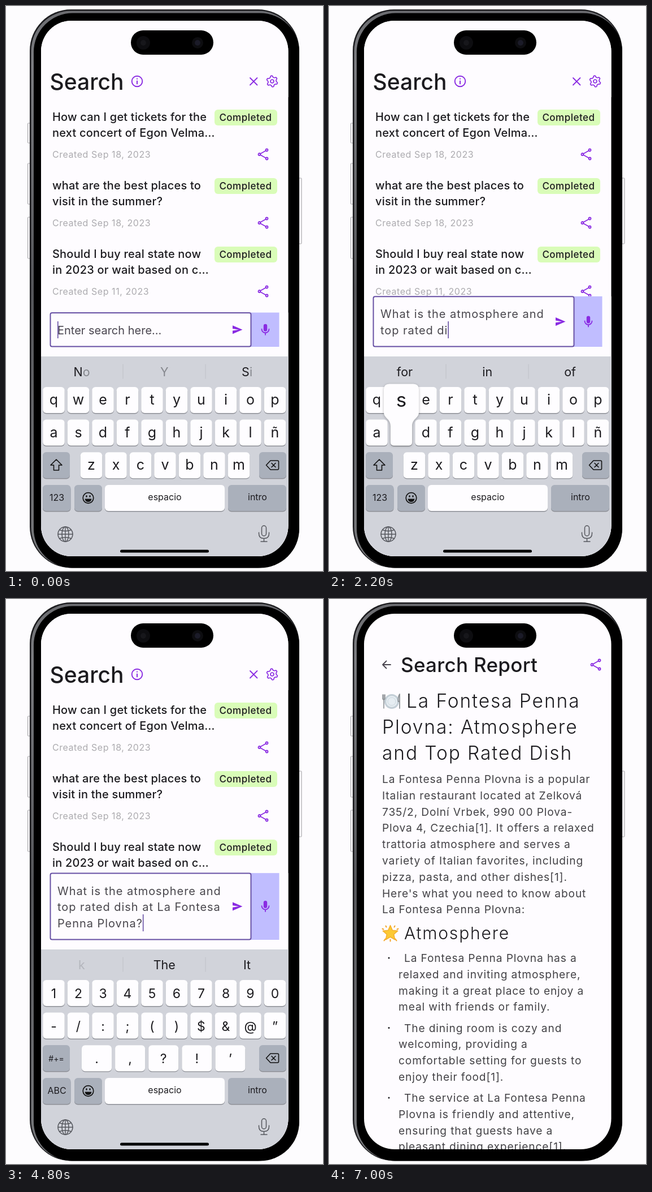
Write an HTML page that moves like this. It is 561x998 px and loops after 8000 ms.

```html
<!DOCTYPE html>
<html lang="en">
<head>
<meta charset="utf-8">
<title>Phone search</title>
<style>
  html, body { margin: 0; width: 100%; height: 100%; overflow: hidden; background: #fdfcfe; }
  svg { display: block; width: 100vw; height: 100vh; font-family: Inter, sans-serif; fill: #1c1b1f; }
  .h1 { font-size: 39px; font-weight: 500; }
  .title { font-size: 20px; font-weight: 500; letter-spacing: .2px; }
  .date { font-size: 16px; letter-spacing: .55px; fill: #acabaf; }
  .badge { font-size: 17px; font-weight: 500; letter-spacing: .5px; }
  .hint { font-size: 20px; fill: #49454f; }
  .typed { font-size: 20px; letter-spacing: .95px; fill: #49474d; white-space: pre; }
  .mid { text-anchor: middle; }
  .word { font-size: 21.5px; }
  .key { font-size: 25px; }
  .num { font-size: 23px; }
  .label { font-size: 16px; }
  .small { font-size: 14px; }
  .pop { font-size: 35px; }
  .tab { font-size: 12px; font-weight: 500; }
  .bar { font-size: 35px; font-weight: 500; letter-spacing: .3px; }
  .h2 { font-size: 33.5px; font-weight: 300; letter-spacing: 1.9px; }
  .h3 { font-size: 30px; font-weight: 300; letter-spacing: 1.8px; }
  .body { font-size: 19.2px; letter-spacing: .85px; fill: #434246; }
  .line { fill: none; stroke-linecap: round; stroke-linejoin: round; }
</style>
</head>
<body>
<svg viewBox="0 0 561 998">
  <defs>
    <linearGradient id="metal" x2="0" y2="1">
      <stop stop-color="#6b6c70"/><stop offset=".1" stop-color="#7c7d81"/>
      <stop offset=".5" stop-color="#55565a"/><stop offset="1" stop-color="#77787b"/>
    </linearGradient>
    <clipPath id="glass"><rect x="62" y="26" width="437.5" height="946" rx="54"/></clipPath>
  </defs>
  <g fill="#f3f2f4" stroke="#a5a4a8">
    <rect x="38.5" y="207" width="6" height="35" rx="1"/>
    <rect x="38.5" y="278" width="6" height="72" rx="1"/>
    <rect x="38.5" y="373" width="6" height="73" rx="1"/>
    <rect x="517" y="304" width="6" height="116" rx="1"/>
  </g>
  <rect x="42" y="6" width="477" height="986.5" rx="73" fill="#1c1c1f"/>
  <rect x="44.5" y="8.500" width="473" height="983" rx="71" fill="url(#metal)"/>
  <rect x="49" y="12.500" width="470" height="980" rx="69" fill="#000"/>
  <g id="screen" clip-path="url(#glass)"></g>
  <rect x="221" y="43" width="146" height="43" rx="21.5" fill="#000"/>
  <g fill="#0d0d10">
    <circle cx="243" cy="65" r="12"/><circle cx="339" cy="65" r="10"/>
    <circle cx="243" cy="65" r="5" fill="#17171b"/><circle cx="339" cy="65" r="5" fill="#1b1b28"/>
  </g>
</svg>
<script>
const PURPLE = '#8a2be2', ACCENT = '#6750a4', PAPER = '#fefcff', LOOP = 8000;
const screen = document.getElementById('screen');

const clamp = (v, a = 0, b = 1) => Math.min(b, Math.max(a, v));
const ease = k => k * k * (3 - 2 * k);
const text = (x, y, s, cls) => `<text x="${x}" y="${y}" class="${cls}">${s.replace('&', '&amp;')}</text>`;
const rect = (x, y, w, h, fill, rx = 0, more = '') =>
  `<rect x="${x}" y="${y}" width="${w}" height="${h}" rx="${rx}" fill="${fill}" ${more}/>`;
const line = (d, color, width = 2) => `<path class="line" d="${d}" stroke="${color}" stroke-width="${width}"/>`;
const fill = (d, color) => `<path d="${d}" fill="${color}"/>`;
const ring = (x, y, r, color, width = 2) =>
  `<circle cx="${x}" cy="${y}" r="${r}" fill="none" stroke="${color}" stroke-width="${width}"/>`;
const move = (x, y, body) => `<g transform="translate(${x} ${y})">${body}</g>`;
const polar = (n, radius) => 'M' + Array.from({ length: n }, (_, i) => {
  const a = (i / n) * 2 * Math.PI - Math.PI / 2;
  return `${(radius(i) * Math.cos(a)).toFixed(2)} ${(radius(i) * Math.sin(a)).toFixed(2)}`;
}).join('L') + 'z';

const share = (x, y) => move(x, y, line('M5-6.500L-5-1M-5 1L5 6.500', PURPLE, 1.7) +
  ring(6.5, -7.5, 2, PURPLE, 1.8) + ring(-6.5, 0, 2, PURPLE, 1.8) + ring(6.5, 7.5, 2, PURPLE, 1.8));
const mic = (x, y) => move(x, y,
  rect(-3.2, -10, 6.4, 13, PURPLE, 3.2) + line('M-6.5-1a6.5 6.5 0 0 0 13 0M0 6V9', PURPLE, 1.8));

// ---- search page ----
const items = [
  ['Which is the best way to go', 'to Tarny Beach from New…', '18'],
  ['Which is the best recipe of', 'apple pie?', '18'],
  ['How can I get tickets for the', 'next concert of Egon Velma…', '18'],
  ['what are the best places to', 'visit in the summer?', '18'],
  ['Should I buy real state now', 'in 2023 or wait based on c…', '11'],
];
const itemList = items.map(([a, b, day], i) => move(0, (i - 2) * 121,
  text(82, 203, a, 'title') + text(82, 231, b, 'title') +
  text(82, 268, `Created Sep ${day}, 2023`, 'date') +
  rect(369, 183, 111, 28, '#d9fcb8', 6) + text(424, 203, 'Completed', 'badge mid') + share(455, 262))).join('');

const header = rect(62, 26, 438, 135, PAPER) + text(77.5, 148, 'Search', 'h1') +
  ring(232, 133, 9.3, PURPLE, 1.9) + line('M232 132.5v5M232 128.6v.1', PURPLE, 2) +
  line('M432 127l12.500 12.500M444.500 127l-12.500 12.500', PURPLE, 1.8) +
  move(471, 133, line(polar(24, i => ((i + 1) % 4 < 2 ? 9.8 : 7.2)), PURPLE, 1.7) + ring(0, 0, 3, PURPLE, 1.7));

const GRAY = '#77757b';
const tabs = ['Search', 'Chat', 'Feed', 'Menu'].map((name, i) =>
  `<g fill="${i ? GRAY : PURPLE}">${text(115 + i * 110, 927, name, 'tab mid')}</g>`).join('') +
  ring(113, 899.5, 5.8, PURPLE) + line('M117.500 904l6 6', PURPLE, 2.2) +
  line('M216.500 911v-18.500h19v14h-15z', GRAY, 1.9) +
  line('M327.500 894.500h16v15.500h-16zM331 892v2M340 892v2', GRAY, 2) +
  rect(327, 894, 17, 5, GRAY) + rect(336, 902, 5, 5, GRAY) +
  [0, 1, 2, 3, 4, 5, 6, 7, 8].map(i => rect(437 + i % 3 * 6.3, 893.5 + Math.floor(i / 3) * 6.3, 4.4, 4.4, GRAY)).join('');

// ---- typing ----
const query = ['What is the atmosphere and ', 'top rated dish at La Fontesa ', 'Penna Plovna?'];
const letters = query.join('');
const pace = [[0, 0], [100, 0], [1300, 28], [2200, 39], [3800, 57], [4500, 68], [4600, 68], [4700, 69], [LOOP, 69]];
function typedAt(t) {
  const i = pace.findLastIndex(p => t >= p[0]);
  const [t0, n0] = pace[i], [t1, n1] = pace[i + 1];
  return n0 + (n1 - n0) * (t - t0) / (t1 - t0);
}

const dim = (s, color = '#85878d') => `<tspan fill="${color}">${s}</tspan>`;
const suggestions = [
  [0, 'N' + dim('o'), dim('Y'), 'S' + dim('i')],
  [200, '«Wh»', 'What', 'Who'],
  [400, 'is', 'are', 'about'],
  [600, '«th»', 'the', 'their'],
  [800, '«atm»', 'atmosphere', 'atm'],
  [1200, 'atmosphere', 'how', 'the'],
  [1400, '«to»', 'top', 'total'],
  [1700, '«rat»', 'rated', 'rate'],
  [2100, 'for', 'in', 'of'],
  [2300, '«dis»', 'dish', 'dishes'],
  [2600, 'at', 'in', 'the'],
  [2900, '«La»', 'Las', 'Last'],
  [3200, '«Fon»', 'Font', 'Fonts'],
  [3700, '«P»', 'Pizza', 'Park'],
  [4000, '«Pen»', 'Penn', 'Pending'],
  [4300, '«Pl»', 'Please', 'Plan'],
  [4700, dim('k', '#b4b6bd'), 'The', 'It'],
];

// ---- keyboard ----
const DARK = '#aab0bb';
const keyCap = (x, y, w, color = '#fefdff') => rect(x, y + 1.4, w, 46, '#8d8f96', 6) + rect(x, y, w, 46, color, 6);

function layout(numeric) {
  const rows = numeric ? ['1234567890', '-/:;()$&@”', '.,?!’'] : ['qwertyuiop', 'asdfghjklñ', 'zxcvbnm'];
  return rows.flatMap((row, r) => [...row].map((char, i) => {
    const wide = numeric && r === 2;
    const x = wide ? 160.5 + i * 59.1 : (r === 2 ? 151 : 84.5) + i * 43.5;
    return { char, x, y: 673 + r * 57.6, w: wide ? 53 : 38.5 };
  }));
}

function popup({ x, y }, char) {
  const b = clamp(x, 96, 466);
  const d = `M${b - 21} ${y - 63}h42q10 0 10 10v40C${b + 31} ${y - 2} ${x + 19} ${y - 2} ${x + 19} ${y + 12}` +
    `V${y + 40}q0 6-6 6H${x - 13}q-6 0-6-6V${y + 12}C${x - 19} ${y - 2} ${b - 31} ${y - 2} ${b - 31} ${y - 13}V${y - 53}q0-10 10-10z`;
  return `<g style="filter:drop-shadow(0 1px 2px #0004)">${fill(d, '#fefdff')}</g>` + text(b, y - 22.5, char, 'pop mid');
}

function keyboard(t, progress) {
  const numeric = t >= 4600, next = letters[Math.floor(progress)] || '';
  const upper = t >= 100 && !numeric && /[A-Z]/.test(next);
  const show = c => upper ? c.toUpperCase() : c;
  const keys = layout(numeric);
  const words = suggestions.findLast(s => t >= s[0]).slice(1);
  let out = rect(62, 619, 438, 360, '#d1d3da') +
    words.map((w, i) => text(134 + i * 146.3, 653.5, w, 'word mid')).join('') +
    line('M207 633v25M353 633v25', '#bec0c7', 1) +
    keys.map(k => keyCap(k.x - k.w / 2, k.y, k.w) +
      text(k.x, k.y + (numeric ? 32 : 31), show(k.char), (numeric ? 'num' : 'key') + ' mid')).join('') +
    keyCap(65, 788, 48, upper ? '#fefdff' : DARK) + keyCap(448, 788, 48, DARK) +
    keyCap(65, 846, 49.5, DARK) + keyCap(121, 846, 49, DARK) + keyCap(175, 846, 212) + keyCap(393, 846, 103, DARK) +
    (numeric ? text(89, 817, '#+=', 'small mid')
      : `<path d="M89 801l10 10h-5.500v9h-9v-9h-5.500z" fill="${upper ? '#111' : 'none'}" stroke="#111" stroke-width="1.6" stroke-linejoin="round"/>`) +
    line('M468 803h12.500q2 0 2 2v12q0 2-2 2h-12.500l-7.500-8zM470 807.500l7 7M477 807.500l-7 7', '#111', 1.6) +
    text(90, 874, numeric ? 'ABC' : '123', 'label mid') + text(281, 873, 'espacio', 'label mid') + text(445, 873, 'intro', 'label mid') +
    ring(145.5, 869, 9.3, '#111', 1.7) + fill('M139.500 870.500h12q-1 5.500-6 5.500t-6-5.500z', '#111') +
    line('M142.500 865.500v1M148.500 865.500v1', '#111', 2.4) +
    ring(105, 933, 13, '#55575d', 1.5) +
    '<ellipse cx="105" cy="933" rx="6" ry="13" fill="none" stroke="#55575d" stroke-width="1.5"/>' +
    line('M105 920v26M92 933h26M95 925.500q10 4 20 0M95 940.500q10-4 20 0', '#55575d', 1.4) +
    rect(452.5, 918, 8, 18, 'none', 4, 'stroke="#55575d" stroke-width="1.5"') +
    line('M447.500 930v2q0 8.500 9 8.500t9-8.500v-2M456.500 941v5M451 946h11', '#55575d', 1.5);
  const pressed = keys.find(k => k.char === next.toLowerCase());
  if (t >= 100 && pressed && progress % 1 < .7) out += popup(pressed, show(pressed.char));
  return out;
}

function searchBox(t, progress, sent) {
  let left = Math.floor(progress);
  const rows = query.map(q => { const s = q.slice(0, left); left = Math.max(0, left - q.length); return s; })
    .filter((s, i) => s || !i);
  const n = rows.length, top = 541.5 - (n - 1) * 28.7, middle = (top + 602) / 2;
  let out = rect(62, top, 438, 700, PAPER) + rect(433, top, 50.5, 602 - top, '#c0bdff') +
    rect(78.5, top + .5, 355, 601 - top, PAPER, 3, sent ? 'stroke="#79747e" stroke-width="1.2"' : `stroke="${ACCENT}" stroke-width="2"`) +
    mic(459, middle);
  out += rows[0] ? rows.map((s, i) => text(91, 580 - (n - 1 - i) * 28.7, s, 'typed')).join('')
    : text(91, 580, 'Enter search here...', 'hint');
  if (sent) {
    const turn = (Math.min(t, 5600) - 5600) * .36;
    out += `<g transform="translate(413.5 ${middle}) rotate(${turn})">` +
      `<path d="M10.200-7.200A12.500 12.500 0 1 1-2.200-12.300" fill="none" stroke="${ACCENT}" stroke-width="3.8"/></g>`;
  } else {
    out += move(401, middle, fill('M0-7.500L17.500 0 0 7.500V1.800L11 0 0-1.800z', PURPLE)) +
      rect(91, 557, 1.6, 30, ACCENT, 0, 'id="caret"');
  }
  return out;
}

// ---- report page ----
const paragraph = [
  'La Fontesa Penna Plovna is a popular', 'Italian restaurant located at Zelková', '735/2, Dolní Vrbek, 990 00 Plova-',
  'Plova 4, Czechia[1]. It offers a relaxed', 'trattoria atmosphere and serves a', 'variety of Italian favorites, including',
  'pizza, pasta, and other dishes[1].', "Here's what you need to know about", 'La Fontesa Penna Plovna:',
];
const bullets = [
  ['La Fontesa Penna Plovna has a', 'relaxed and inviting atmosphere,', 'making it a great place to enjoy a', 'meal with friends or family.'],
  ['The dining room is cozy and', 'welcoming, providing a', 'comfortable setting for guests to', 'enjoy their food[1].'],
  ['The service at La Fontesa Penna', 'Plovna is friendly and attentive,', 'ensuring that guests have a', 'pleasant dining experience[1].'],
];
const plate = ring(111, 181, 10.5, '#c3ced6', 5) + '<circle cx="111" cy="181" r="10" fill="#e6edf2"/>' + ring(111, 181, 7, '#cbd6de', 1) +
  line('M95 169v6q0 3 2 3t2-3v-6M97 169v24', '#8d9296', 1.6) + line('M125 193v-25q-3 4-2.500 13h2.500', '#8d9296', 1.8);
const star = move(108.5, 590.5, line('M-12-7l-2-1M12-7l2-1M0 11v3M-9 10l-2 3M9 10l2 3M-7-11l-1-2M7-11l1-2', '#f4a62a', 2) +
  `<path d="${polar(10, i => i % 2 ? 6.5 : 14)}" fill="#fcc934" stroke="#f5b02e" stroke-width="1.5" stroke-linejoin="round"/>`);
const report = rect(62, 26, 438, 946, PAPER) +
  line('M109 116H95.500M101.500 109.500L95 116l6.500 6.500', '#49454f', 1.8) +
  text(127, 129, 'Search Report', 'bar') + share(472, 116) + plate +
  text(137, 192, 'La Fontesa Penna', 'h2') + text(94, 238, 'Plovna: Atmosphere', 'h2') + text(94, 284, 'and Top Rated Dish', 'h2') +
  paragraph.map((s, i) => text(94, 325 + i * 28.8, s, 'body')).join('') +
  star + text(133, 600.5, 'Atmosphere', 'h3') +
  bullets.map((rows, b) => move(0, b * 123.5, '<circle cx="106" cy="634" r="1.5"/>' +
    rows.map((s, i) => text(i ? 123 : 133, 641 + i * 28.8, s, 'body')).join(''))).join('');

function render(t) {
  const progress = typedAt(t), sent = t >= 5100, hide = ease(clamp((t - 5000) / 400));
  const opacity = clamp((t - 6100) / 300);
  let out = '';
  if (opacity < 1) {
    out += rect(62, 26, 438, 946, PAPER) + move(0, 205 * hide, itemList) + header +
      move(0, 262.5 * hide, searchBox(t, progress, sent)) + (hide ? tabs : '') +
      (hide < 1 ? move(0, 360 * hide, keyboard(t, progress)) : '') +
      rect(202, 960.5, 157, 5, '#000', 2.5);
  }
  if (opacity) out += `<g opacity="${opacity}">${report}</g>`;
  screen.innerHTML = out;

  const caret = document.getElementById('caret'), rows = screen.querySelectorAll('.typed');
  if (caret && rows.length) caret.setAttribute('x', 91 + rows[rows.length - 1].getComputedTextLength());
}

let shown = -1;
function tick(now) {
  const step = Math.floor(now % LOOP / 100) * 100;
  if (step !== shown) render(shown = step);
  requestAnimationFrame(tick);
}
requestAnimationFrame(tick);
</script>
</body>
</html>
```
